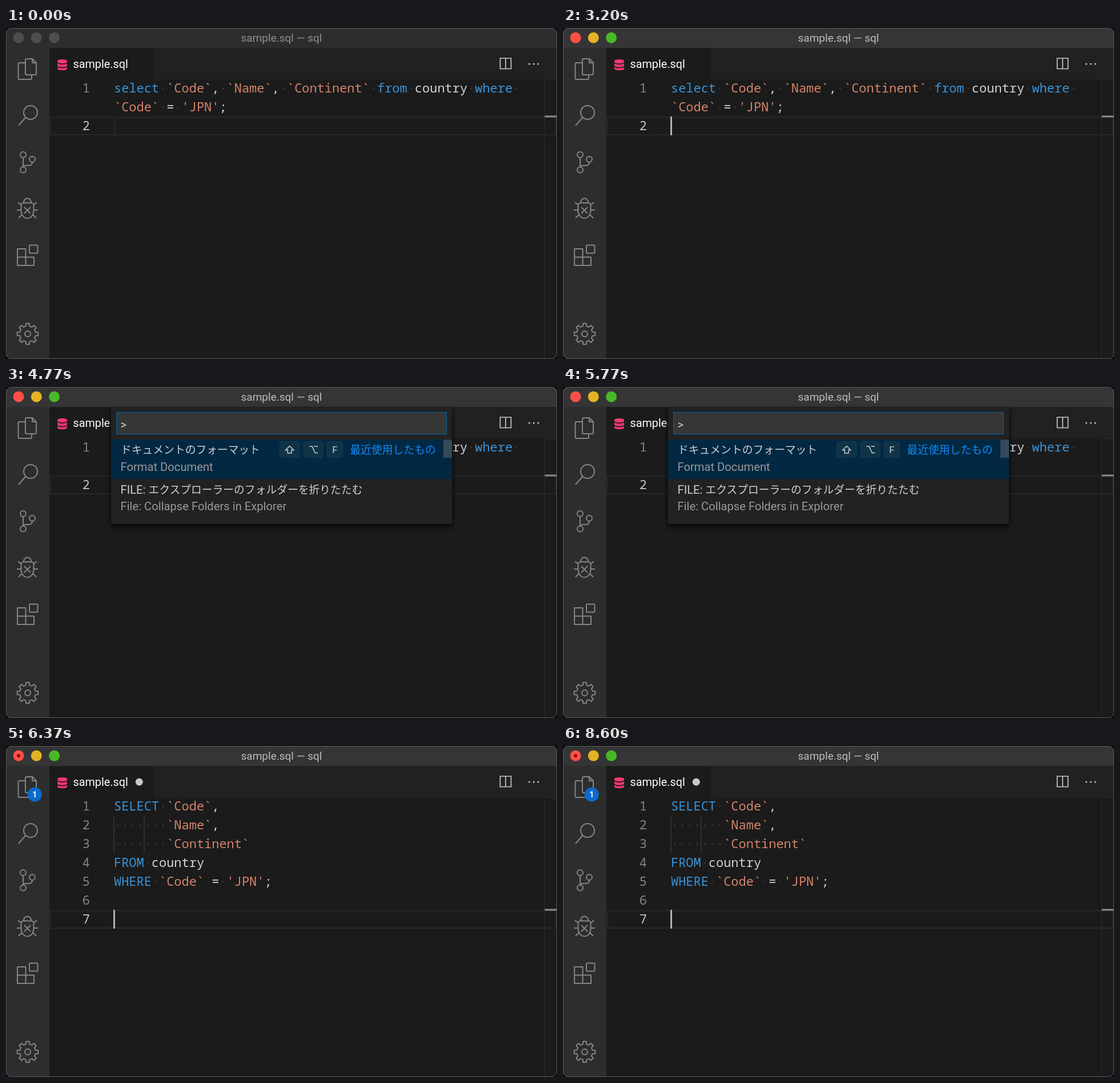
These frames come from a looping animation (965x580 px, 8.63 s). An HTML page:

```html
<!DOCTYPE html>
<html lang="ja">
<head>
<meta charset="utf-8">
<title>Editor</title>
<style>
  html, body { margin: 0; width: 100%; height: 100%; overflow: hidden; background: #050708; }
  svg { display: block; width: 965px; height: 580px; }
  text { white-space: pre; }
  .ui { font-family: Roboto, sans-serif; font-size: 20.2px; fill: #d0d0d0; }
  .cjk { font-family: "Noto Sans CJK JP", "Noto Sans CJK", sans-serif; font-size: 18.8px; fill: #d0d0d0; }
  .title { font-size: 19px; text-anchor: middle; }
  .code { font-family: "Noto Sans Mono", monospace; font-size: 21.96px; fill: #d4d4d4; }
  .keyword { fill: #3794dc; }
  .string { fill: #d58369; }
  .number { fill: #858585; text-anchor: end; }
  .number.current { fill: #c6c6c6; }
  .space { fill: #454545; }
  .icons { fill: none; stroke: #858585; stroke-width: 2; stroke-linejoin: round; }
  .muted { fill: #999; }

  .inactive, .active, .raw, .formatted, .badge, .palette, .caret, .slider {
    animation: 8630ms step-end infinite;
  }
  .inactive { animation-name: inactive; }
  .active { animation-name: active; }
  .raw { animation-name: raw; }
  .formatted { animation-name: formatted; }
  .badge { animation-name: badge; }
  .palette { animation-name: palette; }
  .caret { animation-name: caret; }
  .slider { animation-name: slider; animation-timing-function: linear; }

  @keyframes inactive { 0% { opacity: 1 } 11.587%, 100% { opacity: 0 } }
  @keyframes active { 0% { opacity: 0 } 11.587%, 100% { opacity: 1 } }
  @keyframes palette { 0% { opacity: 0 } 44.844% { opacity: 1 } 69.525%, 100% { opacity: 0 } }
  @keyframes raw { 0% { opacity: 1 } 70.336%, 100% { opacity: 0 } }
  @keyframes formatted { 0% { opacity: 0 } 70.336%, 100% { opacity: 1 } }
  @keyframes badge { 0% { opacity: 0 } 71.842%, 100% { opacity: 1 } }
  @keyframes caret {
    0%, 44.844%, 56.43%, 68.02% { opacity: 1 }
    50.637%, 62.225% { opacity: 0 }
    100% { opacity: 1 }
  }
  @keyframes slider { 0%, 45.19% { opacity: 0 } 46.35%, 100% { opacity: 1 } }
</style>
</head>
<body>
<svg viewBox="0 0 965 580">
  <defs>
    <clipPath id="window"><rect width="965" height="580" rx="9"/></clipPath>
    <filter id="shadow" x="-10%" y="-10%" width="120%" height="130%">
      <feDropShadow dx="0" dy="4" stdDeviation="5" flood-color="#000" flood-opacity=".9"/>
    </filter>
  </defs>

  <g clip-path="url(#window)">
    <rect width="965" height="580" fill="#1b1b1b"/>
    <rect x="75" y="35" width="890" height="55" fill="#212121"/>
    <rect x="76" y="35" width="183" height="55" fill="#1b1b1b"/>
    <rect y="35" width="76" height="545" fill="#2d2d2d"/>

    <!-- title bar -->
    <g class="inactive">
      <rect width="965" height="35" fill="#2d2d2d"/>
      <g fill="#4d4d4d"><circle cx="22" cy="17" r="9.5"/><circle cx="53.3" cy="17" r="9.5"/><circle cx="84.6" cy="17" r="9.5"/></g>
      <text class="ui title" x="482.5" y="23.5" style="fill:#8f8f8f">sample.sql — sql</text>
    </g>
    <g class="active">
      <rect width="965" height="35" fill="#353535"/>
      <circle cx="22" cy="17" r="9.5" fill="#fe5048"/>
      <circle cx="53.3" cy="17" r="9.5" fill="#e4b323"/>
      <circle cx="84.6" cy="17" r="9.5" fill="#48b927"/>
      <text class="ui title" x="482.5" y="23.5" style="fill:#bdbdbd">sample.sql — sql</text>
    </g>

    <!-- activity bar -->
    <g class="icons">
      <path d="M36 54h10l7 7v19a2 2 0 0 1-2 2H36a2 2 0 0 1-2-2V56a2 2 0 0 1 2-2zM46 54v7h7M34 61H23.500a2 2 0 0 0-2 2v25a2 2 0 0 0 2 2H43a2 2 0 0 0 2-2v-6"/>
      <circle cx="43" cy="148" r="12"/><path d="M34.500 156.500L22 171"/>
      <circle cx="30" cy="222" r="5"/><circle cx="30" cy="248.500" r="5"/><circle cx="46" cy="230" r="5"/>
      <path d="M30 227v16.500M46 235c0 4-2 6-6 6h-5c-3 0-5 1-5 3"/>
      <path d="M30 306.500h15c2 0 3.500 2 3.500 4v9c0 8-5 14-11 14s-11-6-11-14v-9c0-2 1.500-4 3.500-4zM31 306c0-10 13-10 13 0M32 314l11 11M43 314l-11 11M19 319h7.500M48.500 319H56M27 310.500l-6-5M48 310.500l6-5M28 327l-6 6M47 327l6 6"/>
      <path d="M20 387h14.500v14.500H49V416H20zM20 401.500h14.500V416"/>
      <rect x="41" y="380.500" width="14.500" height="14" rx="1"/>
      <path id="gear"/><circle cx="38" cy="536" r="5"/>
    </g>
    <g class="badge">
      <circle cx="50.3" cy="85" r="12.5" fill="#0b6bce"/>
      <text class="ui" x="50.3" y="90" text-anchor="middle" style="font-size:14px;font-weight:600;fill:#fff">1</text>
    </g>

    <!-- tab and editor actions -->
    <g fill="#f2386f">
      <path d="M90 57.500c0-3.500 17-3.500 17 0v2c0 3.500-17 3.500-17 0z"/>
      <path d="M90 62c3 2.500 14 2.500 17 0v4c0 3.500-17 3.500-17 0z"/>
      <path d="M90 68.500c3 2.500 14 2.500 17 0v3c0 3.500-17 3.500-17 0z"/>
    </g>
    <text class="ui" x="117.5" y="70" style="font-size:19.8px;fill:#fff">sample.sql</text>
    <path d="M865.500 53h19v18.500h-19zM875 53v18.500" fill="none" stroke="#c8c8c8" stroke-width="1.7"/>
    <g fill="#c8c8c8"><circle cx="916.5" cy="63" r="1.5"/><circle cx="924.3" cy="63" r="1.5"/><circle cx="932" cy="63" r="1.5"/></g>

    <!-- editor -->
    <path d="M943.500 90V580M943 90.500h22" stroke="#2b2b2b" fill="none"/>
    <g class="raw" id="raw"></g>
    <g class="formatted">
      <circle cx="22" cy="17" r="3" fill="#860a07"/>
      <circle cx="233.3" cy="63" r="6.5" fill="#c8c8c8"/>
      <path d="M189 122v66M242 122v66" stroke="#3c3c3c" stroke-width="1.3"/>
      <g id="formatted"></g>
    </g>

    <!-- command palette -->
    <g class="palette">
      <rect x="184" y="36" width="597" height="204" fill="#212121" filter="url(#shadow)"/>
      <rect x="193.5" y="44.500" width="578" height="38" fill="#363636" stroke="#075c94" stroke-width="1.3"/>
      <text class="ui" x="200.5" y="72.5">&gt;</text>
      <rect class="caret" x="213.3" y="54" width="1.6" height="23" fill="#d4d4d4"/>
      <rect x="184" y="92" width="597" height="69" fill="#022843"/>
      <text class="cjk" x="201" y="117">ドキュメントのフォーマット</text>
      <text class="ui muted" x="200.5" y="147">Format Document</text>
      <text class="ui" x="200.5" y="186.500">FILE: <tspan class="cjk">エクスプローラーのフォルダーを折りたたむ</tspan></text>
      <text class="ui muted" x="200.5" y="216">File: Collapse Folders in Explorer</text>
      <text class="cjk" x="602.5" y="117" style="fill:#1289f5">最近使用したもの</text>
      <g fill="#0f3347" stroke="#173d50">
        <rect x="479.5" y="95.5" width="34.5" height="28" rx="4"/>
        <rect x="521.5" y="95.5" width="33.5" height="28" rx="4"/>
        <rect x="562.5" y="95.5" width="27" height="28" rx="4"/>
      </g>
      <path d="M496.700 103.500l7 7h-3.700v5.500h-6.600v-5.500h-3.700zM531.500 104h4.500l5.500 11.500h4.500M539.500 104h6.500" fill="none" stroke="#d0d0d0" stroke-width="1.5"/>
      <text class="ui" x="576" y="116" text-anchor="middle" style="font-size:17px">F</text>
      <rect class="slider" x="766" y="92.5" width="15" height="31.5" fill="#797979" fill-opacity=".42"/>
    </g>
  </g>
  <rect x=".5" y=".5" width="964" height="579" rx="9" fill="none" stroke="#5a5a5a"/>
</svg>

<script>
  const LEFT = 189, TOP = 89, ROW = 33, ADVANCE = 13.18, BASELINE = 24.3;
  const TOKEN = /\b(?:select|from|where)\b|[`'][^`']*[`']/gi;

  const rowTop = row => TOP + row * ROW;

  const markToken = token =>
    `<tspan class="${/^[`']/.test(token) ? 'string' : 'keyword'}">${token}</tspan>`;

  function codeLine(row, code) {
    const y = rowTop(row);
    const dots = [...code].map((char, col) => char === ' '
      ? `<circle class="space" cx="${LEFT + (col + 0.5) * ADVANCE}" cy="${y + 17}" r="1.2"/>` : '');
    return `<text class="code" x="${LEFT}" y="${y + BASELINE}">${code.replace(TOKEN, markToken)}</text>` + dots.join('');
  }

  const lineNumber = (row, number, state = '') =>
    `<text class="code number ${state}" x="147" y="${rowTop(row) + BASELINE}">${number}</text>`;

  function currentLine(row, number, cursorClass = '') {
    const y = rowTop(row);
    return `<path d="M78 ${y + 1.5}H963V${y + 32}H78zM190 ${y + 1}v31" fill="none" stroke="#282828" stroke-width="2"/>
      <rect x="943.5" y="${y - 1.5}" width="22" height="3" fill="#8c8c8c"/>
      <rect class="${cursorClass}" x="188" y="${y}" width="3" height="33" fill="#b2b2b2"/>` +
      lineNumber(row, number, 'current');
  }

  const byId = id => document.getElementById(id);

  byId('raw').innerHTML = currentLine(2, 2, 'active') + lineNumber(0, 1) +
    codeLine(0, 'select `Code`, `Name`, `Continent` from country where ') +
    codeLine(1, "`Code` = 'JPN';");

  const query = ['SELECT `Code`,', '       `Name`,', '       `Continent`', 'FROM country', "WHERE `Code` = 'JPN';", ''];
  byId('formatted').innerHTML = currentLine(6, 7) +
    query.map((code, row) => lineNumber(row, row + 1) + codeLine(row, code)).join('');

  // Each tooth spans 45 degrees: two outer corners, two inner ones.
  const corners = [[-9, 18.5], [9, 18.5], [13, 14], [32, 14]];
  const gear = Array.from({ length: 8 }, (_, tooth) => corners.map(([degrees, radius]) => {
    const angle = (tooth * 45 + degrees) * Math.PI / 180;
    return `${38 + radius * Math.sin(angle)} ${536 - radius * Math.cos(angle)}`;
  })).flat();
  byId('gear').setAttribute('d', `M${gear.join('L')}z`);
</script>
</body>
</html>
```
